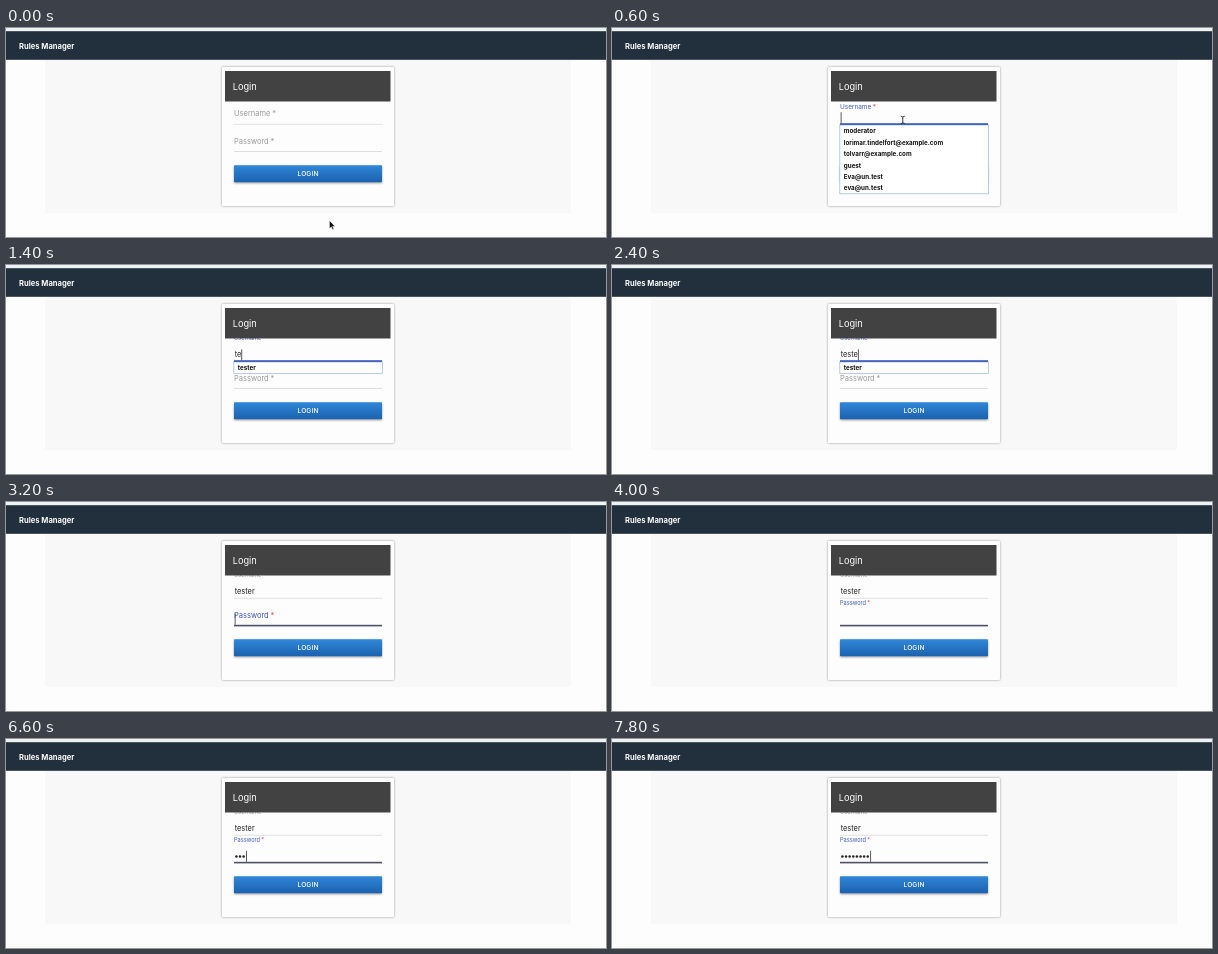
An HTML page for the animation above (8000 ms loop, 600 by 209 pixels).

```html
<!DOCTYPE html>
<html lang="en">
<head>
<meta charset="utf-8">
<title>Login</title>
<style>
  html, body { margin: 0; width: 100%; height: 100%; overflow: hidden; background: #fdfdfd; }
  svg { display: block; width: 600px; height: 209px; font-family: Inter, Roboto, sans-serif; }
  .card { fill: #fdfdfd; filter: drop-shadow(0 .7px .8px rgba(0, 0, 0, .42)); }
  .button { filter: drop-shadow(0 1px 1px rgba(0, 0, 0, .38)); }
  .label { font-size: 7.5px; fill: #999; }
  .label.focus { fill: #4058b8; }
  .label.focus .star { fill: #f44336; }
  .value { font-size: 7.4px; fill: #222; }
  .option { font-size: 6.25px; font-weight: 700; fill: #111; }
</style>
</head>
<body>
<svg viewBox="0 0 600 209">
  <defs>
    <linearGradient id="blue" x2="0" y2="1">
      <stop stop-color="#3087d8"/>
      <stop offset="1" stop-color="#1b61ae"/>
    </linearGradient>
  </defs>
  <rect width="600" height="209" fill="#fdfdfd"/>
  <rect width="600" height="3.4" fill="#edf2f2"/>
  <rect x="39" y="32" width="526" height="153" fill="#f8f8f8"/>
  <rect y="3.2" width="600" height="28.6" fill="#222f3c"/>
  <text x="13" y="20.7" font-size="7.6" font-weight="700" fill="#fff">Rules Manager</text>

  <rect class="card" x="216" y="39" width="172" height="139" rx="1"/>
  <text id="userLabel" class="label">Username<tspan class="star" dx="1.8">*</tspan></text>
  <text id="passLabel" class="label">Password<tspan class="star" dx="1.8">*</tspan></text>
  <rect x="219" y="43" width="165.5" height="30.5" fill="#424242"/>
  <text x="226.7" y="62" font-size="9.2" fill="#fff">Login</text>

  <rect id="userLine" x="228" width="148"/>
  <rect id="passLine" x="228" width="148"/>
  <rect class="button" x="228" y="137.3" width="148" height="17" rx=".8" fill="url(#blue)"/>
  <text x="302" y="148.4" font-size="6.6" font-weight="500" letter-spacing=".15" text-anchor="middle" fill="#fff">LOGIN</text>

  <text id="userValue" class="value" x="228.7" y="92.3"></text>
  <g id="dots" fill="#222"></g>
  <g id="list">
    <rect id="listBox" x="227.8" y="96.8" width="148.6" fill="#fff" stroke="#a5bfdc" stroke-width=".8"/>
    <rect x="228" y="95.4" width="148" height="1.7" fill="#4463bd"/>
  </g>
  <rect id="caret" width=".8" height="11" fill="#333"/>
  <path id="arrow" d="M0 0V8.2L1.9 6.5L3.2 9.3L4.5 8.7L3.2 6H5.7Z" fill="#111" stroke="#fff" stroke-width=".5"/>
  <path id="beam" d="M288.8 88.2Q290.8 88.2 290.8 89.5V94.3Q290.8 95.6 288.8 95.6M292.8 88.2Q290.8 88.2 290.8 89.5M292.8 95.6Q290.8 95.6 290.8 94.3" fill="none" stroke="#222" stroke-width=".9"/>
</svg>
<script>
const LOOP = 8000, TICK = 200;
const ACCOUNT = 'tester';
const OPTIONS = ['moderator', 'lorimar.tindelfort@example.com', 'tolvarr@example.com',
                 'guest', 'Eva@un.test', 'eva@un.test'];
const $ = id => document.getElementById(id);
const clamp = (v, lo, hi) => Math.min(hi, Math.max(lo, v));
const set = (id, attrs) => {
  for (const name in attrs) $(id).setAttribute(name, attrs[name]);
};
const show = (el, on) => { el.style.display = on ? '' : 'none'; };

function add(parent, tag, attrs, text = '') {
  const el = document.createElementNS('http://www.w3.org/2000/svg', tag);
  for (const name in attrs) el.setAttribute(name, attrs[name]);
  el.textContent = text;
  return $(parent).appendChild(el);
}

const dots = Array.from({ length: 8 }, (_, i) =>
  add('dots', 'circle', { cx: 230.4 + 3.62 * i, cy: 117.5, r: 1.25 }));
const options = OPTIONS.map((text, i) =>
  add('list', 'text', { class: 'option', x: 231.8, y: 105.4 + 11.4 * i }, text));

// Labels float up and shrink within two ticks of focus.
const floated = (t, start) => t <= start ? 0 : t <= start + TICK ? .57 : 1;

function drawLabel(id, baseline, p, focus) {
  set(id, {
    class: focus ? 'label focus' : 'label',
    transform: `translate(228 ${baseline - 12.8 * p}) scale(${1 - .25 * p})`
  });
}

function drawLine(id, y, color, focus) {
  const height = focus ? 1.6 : .8;
  set(id, { y: y - height / 2, height, fill: focus ? color : '#d9d9d9' });
}

function typedCount(t) {
  if (t < 1400) return 0;
  return clamp(2 + Math.floor((t - 1800) / TICK), 2, ACCOUNT.length);
}

function caretOpacity(t) {
  if (t < 600) return 0;
  if (t < 1400) return t < 1000 ? 1 : t < 1200 ? .5 : 0;
  if (t < 3200 || t >= 6200) return 1;
  const phase = (t - 3200) % 1000;
  return phase < 600 ? 1 : phase < 800 ? .45 : 0;
}

function draw(t) {
  const inUser = t >= 600 && t < 3200, inPass = t >= 3200;
  const typed = typedCount(t);
  const secret = clamp(Math.floor((t - 5870) / 240), 0, 8);

  drawLabel('userLabel', 88, floated(t, 400), inUser);
  drawLabel('passLabel', 115.6, floated(t, 3200), inPass);
  drawLine('userLine', 96.2, '#4463bd', inUser);
  drawLine('passLine', 123.6, '#4b5264', inPass);

  $('userValue').textContent = ACCOUNT.slice(0, typed);
  dots.forEach((dot, i) => show(dot, i < secret));

  show($('list'), t >= 600 && t < 3000);
  set('listBox', { height: typed ? 11.6 : 69 });
  options.forEach((option, i) => {
    option.textContent = typed ? ACCOUNT : OPTIONS[i];
    show(option, !typed || i === 0);
  });

  const textWidth = typed ? $('userValue').getComputedTextLength() : 0;
  set('caret', {
    x: inPass ? 228.7 + 3.62 * secret + (secret ? .6 : 0) : 228.7 + textWidth,
    y: inPass ? 111.8 : 84.3,
    opacity: caretOpacity(t)
  });

  const travel = t < TICK ? 0 : .5;
  show($('arrow'), t < 400);
  set('arrow', { transform: `translate(${323.4 - 33 * travel} ${192.4 - 101 * travel})` });
  show($('beam'), t >= 400 && t < 1400);
}

let shown = -1;
function frame() {
  const t = Math.floor(performance.now() % LOOP / TICK) * TICK;
  if (t !== shown) draw(shown = t);
  requestAnimationFrame(frame);
}
frame();
</script>
</body>
</html>
```
